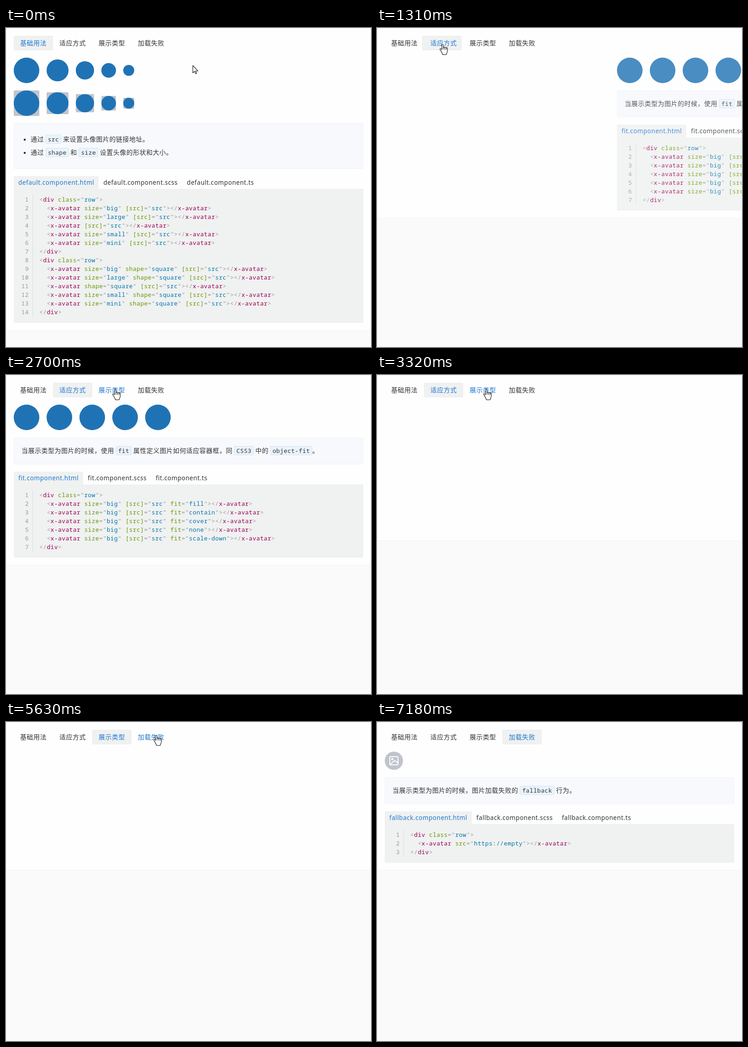
Write an HTML page that moves like this. It is 800 px wide and 700 px high and loops after 7730 ms.

```html
<!DOCTYPE html>
<html lang="zh-CN">
<head>
<meta charset="utf-8">
<title>Avatar</title>
<style>
html, body { margin: 0; width: 100%; height: 100%; overflow: hidden; background: #fafafa; }
body { position: relative; color: #333; font: 14px "Noto Sans CJK SC", "Noto Sans CJK JP", "Noto Sans CJK", sans-serif; letter-spacing: .5px; }
* { box-sizing: border-box; }
#card { width: 800px; padding: 16px; border: 1px solid #f0f2f5; background: #fefefe; overflow: hidden; }
#nav { position: relative; display: flex; height: 32px; margin-bottom: 16px; line-height: 30px; }
#nav span { position: relative; width: 86px; padding-left: 14px; white-space: nowrap; }
#marker { position: absolute; width: 86px; height: 32px; border: 1px solid #ebeded; border-radius: 2px; background: #f0f1f1; }
.row { display: flex; align-items: center; gap: 16px; margin-bottom: 16px; }
.avatar { display: flex; flex: none; align-items: center; justify-content: center; border-radius: 50%; background: #c0c4cc; color: #fff; font-size: 24px; letter-spacing: 0; }
.avatar.square { border-radius: 2px; }
.avatar i { width: 100%; height: 100%; border-radius: 50%; background: #1f73b5; }
.avatar svg { width: 24px; height: 24px; fill: none; stroke: #fff; stroke-width: 2; }
.note { padding: 14px 16px; border: 1px solid #f0f3f9; border-radius: 2px; background: #f7f9fd; white-space: nowrap; }
.note.list { padding: 20px 36px; }
.note div { position: relative; height: 29px; line-height: 27px; }
.list div::before { content: ""; position: absolute; left: -15px; top: 13px; width: 4px; height: 4px; background: #333; }
code, .code { font: 13px "Noto Sans Mono", monospace; letter-spacing: .4px; }
code { padding: 0 4px; border: 1px solid #d3e5f4; border-radius: 2px; background: #e9f3fc; line-height: 1; }
.files { display: flex; height: 28px; margin-top: 16px; font: 13.6px/28px "Noto Sans", sans-serif; }
.files span { padding: 0 10px; border-radius: 2px 2px 0 0; }
.files span:first-child { background: #f0f1f1; color: #1e78d2; }
.code { padding: 14px 0; border-radius: 0 0 2px 2px; background: #f0f1f1; }
.code div { height: 19px; line-height: 19px; white-space: pre; }
.code u { display: inline-block; width: 42px; height: 19px; margin-right: 14px; padding-right: 8px; border-right: 1px solid #ddd; color: #999; text-align: right; text-decoration: none; vertical-align: top; }
.mark { color: #999; } .tag { color: #905; } .attr { color: #690; } .value { color: #07a; }
#cursor { position: absolute; left: 0; top: 0; width: 24px; height: 28px; overflow: visible; fill: #fff; stroke: #111; stroke-width: 1.1; stroke-linejoin: round; }
</style>
</head>
<body>
<div id="card">
  <div id="nav"><div id="marker"></div><span>基础用法</span><span>适应方式</span><span>展示类型</span><span>加载失败</span></div>
  <div id="pages"></div>
</div>
<svg id="cursor">
  <path id="arrow" d="M.5.5V16.5L4.3 13 6.8 18.5 9 17.5 6.6 12.2H11.5Z"/>
  <path id="hand" d="M6.5 1C5.4 1 5 1.8 5 2.7V12.5L3.5 10.8C2.5 9.8.6 10.4 1 12 1.5 13.5 3.5 15.5 4.5 18 5.3 20 6.5 21 6.8 23.5H15C15.2 20.5 17.5 18.5 17.5 15V9.5C17.5 8 15.3 7.7 14.8 9 14.6 7.2 12 7 11.5 8.5 11.2 6.8 8.5 6.8 8.2 8V2.7C8.2 1.8 7.6 1 6.5 1ZM8.2 8v4M11.5 8.5v4M14.8 9v4"/>
</svg>
<script>
const $ = id => document.getElementById(id);
const span = (cls, text) => `<span class="${cls}">${text.replace(/</g, '&lt;')}</span>`;

// Markup builders
const highlight = line => line.replace(/(<\/?)([\w-]+)|([\[\]\w]+)="([^"]*)"|>/g, (all, open, tag, attr, value) =>
  tag ? span('mark', open) + span('tag', tag)
  : attr ? span('attr', attr) + span('mark', '="') + span('value', value) + span('mark', '"')
  : span('mark', '&gt;'));
const block = attrs => ['<div class="row">', ...attrs.map(a => `  <x-avatar ${a}></x-avatar>`), '</div>'];
const avatar = (size, content = '<i></i>', shape = '') =>
  `<div class="avatar ${shape}" style="width:${size}px;height:${size}px">${content}</div>`;
const row = avatars => `<div class="row">${avatars.join('')}</div>`;
const icon = shapes => `<svg viewBox="0 0 24 24">${shapes}</svg>`;

const sizes = [56, 48, 40, 32, 24];
const sizeAttrs = ['size="big" ', 'size="large" ', '', 'size="small" ', 'size="mini" '];
const person = icon('<circle cx="12" cy="7.5" r="4"/><path d="M4 22v-2a5 5 0 0 1 5-5h6a5 5 0 0 1 5 5v2"/>');
const picture = icon('<rect x="3" y="3" width="18" height="18" rx="2"/><circle cx="8.5" cy="8.5" r="1.5"/><path d="M4 20 14 11.5 21 17"/>');

const pages = [
  {
    name: 'default', list: 'list',
    rows: [sizes.map(s => avatar(s)), sizes.map(s => avatar(s, '<i></i>', 'square'))],
    notes: ['通过 <code>src</code> 来设置头像图片的链接地址。',
      '通过 <code>shape</code> 和 <code>size</code> 设置头像的形状和大小。'],
    code: [...block(sizeAttrs.map(a => a + '[src]="src"')),
      ...block(sizeAttrs.map(a => a + 'shape="square" [src]="src"'))]
  },
  {
    name: 'fit',
    rows: [Array(5).fill(avatar(56))],
    notes: ['当展示类型为图片的时候，使用 <code>fit</code> 属性定义图片如何适应容器框，同 <code>CSS3</code> 中的 <code>object-fit</code>。'],
    code: block(['fill', 'contain', 'cover', 'none', 'scale-down'].map(f => `size="big" [src]="src" fit="${f}"`))
  },
  {
    name: 'display',
    rows: [[avatar(40), avatar(40, person), avatar(40, '王')]],
    notes: ['除了显示图片，还支持使用 <code>icon</code> 来设置图标， <code>label</code> 来设置文字显示。'],
    code: block(['src', 'icon', 'label'].map(a => `[${a}]="${a}"`))
  },
  {
    name: 'fallback',
    rows: [[avatar(40, picture)]],
    notes: ['当展示类型为图片的时候，图片加载失败的 <code>fallback</code> 行为。'],
    code: block(['src="https://empty"'])
  }
];

$('pages').innerHTML = pages.map(p => `<section>
  ${p.rows.map(row).join('')}
  <div class="note ${p.list || ''}">${p.notes.map(n => `<div>${n}</div>`).join('')}</div>
  <div class="files">${['html', 'scss', 'ts'].map(e => `<span>${p.name}.component.${e}</span>`).join('')}</div>
  <div class="code">${p.code.map((line, i) => `<div><u>${i + 1}</u>${highlight(line)}</div>`).join('')}</div>
</section>`).join('');

// Motion
const clamp = x => Math.min(1, Math.max(0, x));
const smooth = x => x * x * (3 - 2 * x);
function bezier(x1, y1, x2, y2) {
  const at = (a, b, s) => 3 * a * s * (1 - s) ** 2 + 3 * b * s * s * (1 - s) + s ** 3;
  return x => {
    let lo = 0, hi = 1;
    for (let i = 0; i < 20; i++) {
      const mid = (lo + hi) / 2;
      if (at(x1, x2, mid) < x) lo = mid; else hi = mid;
    }
    return x <= 0 ? 0 : x >= 1 ? 1 : at(y1, y2, lo);
  };
}
const ease = bezier(.25, .1, .25, 1), easeInOut = bezier(.42, 0, .58, 1);

const LOOP = 7730, STEP = 77.16;
const switches = [-9999, 1080, 3318, 5632];   // when each page replaces the last
const hovers = [Infinity, 800, 1770, 3770];
const route = [[309, 409, 82], [848, 144, 36], [1466, 144, 36], [1700, 237, 36], [1851, 240, 32],
  [3540, 240, 32], [3780, 338, 31], [3860, 338, 31], [4088, 330, 29], [6327, 330, 29], [7098, 722, 689]];

function cursorAt(t) {
  const next = route.findIndex(p => p[0] > t);
  if (next < 0) return route.at(-1).slice(1);
  if (next === 0) return route[0].slice(1);
  const [t0, x0, y0] = route[next - 1], [t1, x1, y1] = route[next];
  const p = smooth((t - t0) / (t1 - t0));
  return [x0 + (x1 - x0) * p, y0 + (y1 - y0) * p];
}

const tabs = [...$('nav').querySelectorAll('span')];
const sections = [...document.querySelectorAll('section')];

function draw(t) {
  const current = switches.filter(s => t >= s - 2).length - 1;
  const age = t - switches[current];
  const slideAge = age - 111;
  const markerMove = ease(clamp((age - 15) / 300));
  const active = markerMove > 0 ? current : current - 1;

  sections.forEach((s, i) => s.style.display = i === current ? 'block' : 'none');
  const page = sections[current].style;
  page.visibility = slideAge > 0 ? 'visible' : 'hidden';
  page.transform = slideAge < 300 ? `translateX(${Math.round(766 * (1 - easeInOut(clamp(slideAge / 300))))}px)` : 'none';
  page.opacity = .7 + .3 * clamp(slideAge / 340);
  $('marker').style.left = Math.round(86 * Math.max(0, current - 1 + markerMove)) + 'px';

  const [x, y] = cursorAt(t);
  const overTab = y < 49 && x < 361 ? Math.floor((x - 17) / 86) : -1;
  tabs.forEach((tab, i) => {
    const hovered = i === overTab && t >= hovers[i];
    const pressed = i === 1 && t > 990 && t < 1075;
    tab.style.color = pressed ? '#4f9ce6' : hovered || i === active ? '#1e78d2' : '#333';
  });

  const isHand = overTab >= 0;
  $('hand').style.display = isHand ? '' : 'none';
  $('arrow').style.display = isHand ? 'none' : '';
  $('cursor').style.display = t < 7165 ? '' : 'none';
  $('cursor').style.transform = `translate(${Math.round(x) - (isHand ? 7 : 0)}px, ${Math.round(y) - (isHand ? 1 : 0)}px)`;
}

function tick() {
  const step = Math.floor((performance.now() % LOOP + 7) / STEP);
  draw(Math.min(99, step) * STEP);
  requestAnimationFrame(tick);
}
tick();
</script>
</body>
</html>
```
